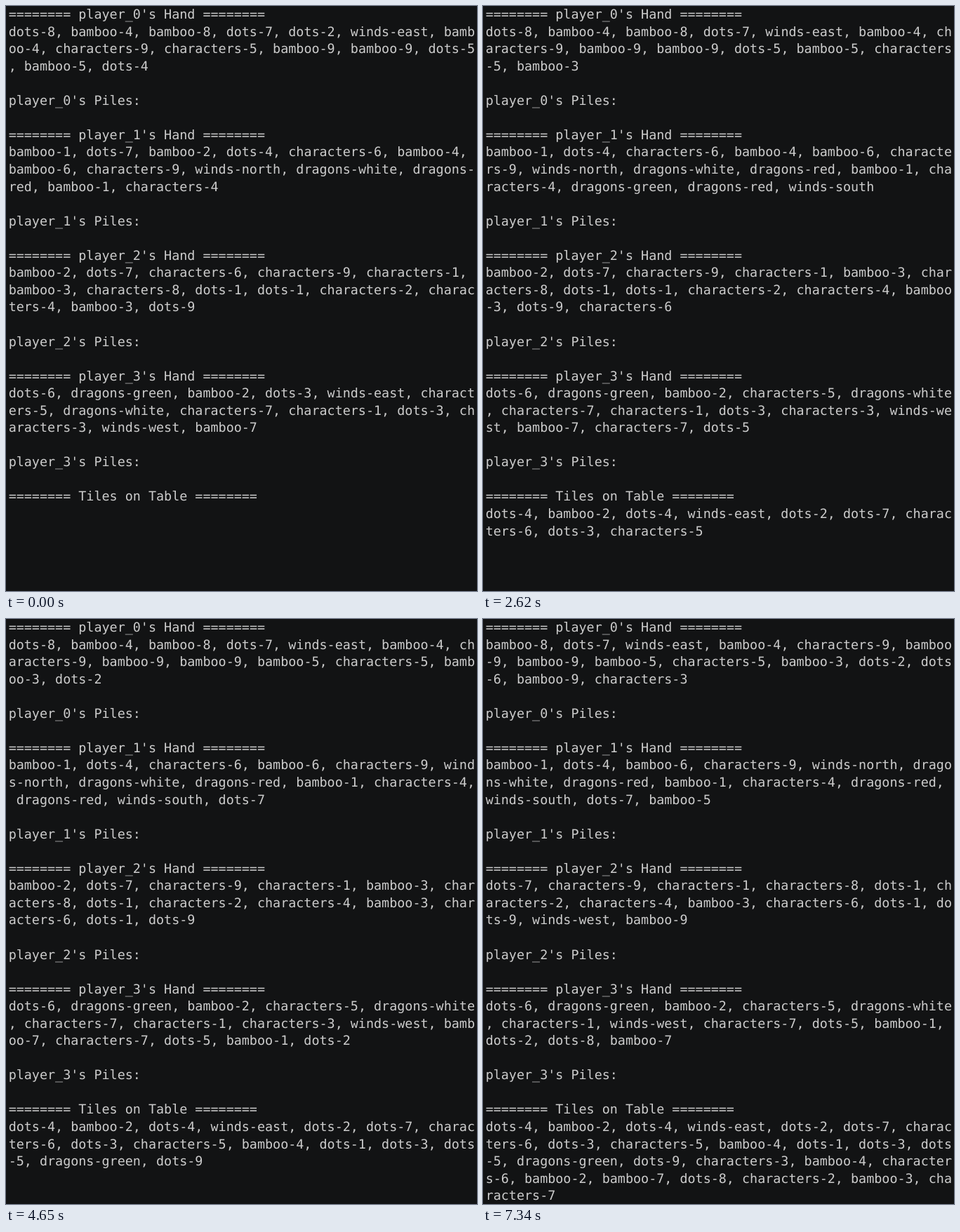
These frames come from a looping animation (671 px wide and 834 px high, 8340 ms). An HTML page:

```html
<!DOCTYPE html>
<html lang="en">
<head>
<meta charset="utf-8">
<title>Tile game log</title>
<style>
  html, body { margin: 0; width: 100%; height: 100%; overflow: hidden; background: #121314; }
  svg { display: block; width: 671px; height: 834px; }
  text {
    font: 18.4px "DejaVu Sans Mono", monospace;
    fill: #ccc;
    white-space: pre;
    text-rendering: geometricPrecision;
  }
</style>
</head>
<body>
<svg viewBox="0 0 671 834">
  <!-- The tiny turn keeps baselines from snapping to whole pixels. -->
  <g id="screen" transform="rotate(0.001)"></g>
</svg>
<script>
const COLS = 60, ROWS = 34, LEFT = 3.65, PITCH = 24.553, BASE = 18, LOOP = 8340;

const times = [0, 260, 520, 850, 1110, 1440, 1700, 1960, 2290, 2620, 2950, 3210, 3470,
  3800, 4130, 4390, 4650, 4980, 5240, 5570, 5900, 6160, 6420, 6750, 7010, 7340];

const deal = [
  "dots-8 bamboo-4 bamboo-8 dots-7 dots-2 winds-east bamboo-4 characters-9 characters-5 bamboo-9 bamboo-9 dots-5 bamboo-5 dots-4",
  "bamboo-1 dots-7 bamboo-2 dots-4 characters-6 bamboo-4 bamboo-6 characters-9 winds-north dragons-white dragons-red bamboo-1 characters-4",
  "bamboo-2 dots-7 characters-6 characters-9 characters-1 bamboo-3 characters-8 dots-1 dots-1 characters-2 characters-4 bamboo-3 dots-9",
  "dots-6 dragons-green bamboo-2 dots-3 winds-east characters-5 dragons-white characters-7 characters-1 dots-3 characters-3 winds-west bamboo-7"
];

// Each step: the tile discarded, then the tile the next player draws ("-" for none).
const steps = `
  dots-4 dragons-green
  bamboo-2 dots-4
  dots-4 characters-7
  winds-east characters-5
  dots-2 dragons-red
  dots-7 characters-6
  characters-6 dots-5
  dots-3 bamboo-3
  characters-5 winds-south
  bamboo-4 -
  - dots-1
  dots-1 bamboo-1
  dots-3 dots-2
  dots-5 dots-7
  dragons-green dots-9
  dots-9 dots-2
  characters-3 dots-6
  bamboo-4 characters-2
  characters-6 winds-west
  bamboo-2 dots-8
  bamboo-7 bamboo-9
  dots-8 bamboo-5
  characters-2 bamboo-9
  bamboo-3 bamboo-7
  characters-7 characters-3
`.trim().split("\n").map(line => line.trim().split(" "));

const header = title => `======== ${title} ========`;

function wrap(tiles) {
  const line = tiles.join(", "), rows = [];
  for (let i = 0; i < line.length; i += COLS) rows.push(line.slice(i, i + COLS));
  return rows;
}

function page(hands, table) {
  const blocks = hands.flatMap((hand, i) => [
    header(`player_${i}'s Hand`), ...wrap(hand), "", `player_${i}'s Piles:`, ""
  ]);
  return [...blocks, header("Tiles on Table"), ...wrap(table)];
}

function play() {
  const hands = deal.map(hand => hand.split(" ")), table = [];
  const pages = [page(hands, table)];
  let turn = 0;
  for (const [discard, draw] of steps) {
    if (discard !== "-") {
      hands[turn].splice(hands[turn].indexOf(discard), 1);
      table.push(discard);
    }
    if (draw !== "-") {
      turn = (turn + 1) % hands.length;
      hands[turn].push(draw);
    }
    pages.push(page(hands, table));
  }
  return pages;
}

const pages = play();
const screen = document.getElementById("screen");
const rows = Array.from({ length: ROWS }, (_, r) => {
  const row = document.createElementNS("http://www.w3.org/2000/svg", "text");
  row.setAttribute("x", LEFT);
  row.setAttribute("y", BASE + r * PITCH);
  return screen.appendChild(row);
});

let shown = -1;
function show(index) {
  if (index === shown) return;
  shown = index;
  rows.forEach((row, r) => { row.textContent = pages[index][r] || ""; });
}

function tick() {
  const t = performance.now() % LOOP;
  show(times.findLastIndex(start => start <= t));
  requestAnimationFrame(tick);
}

show(0);
requestAnimationFrame(tick);
</script>
</body>
</html>
```
